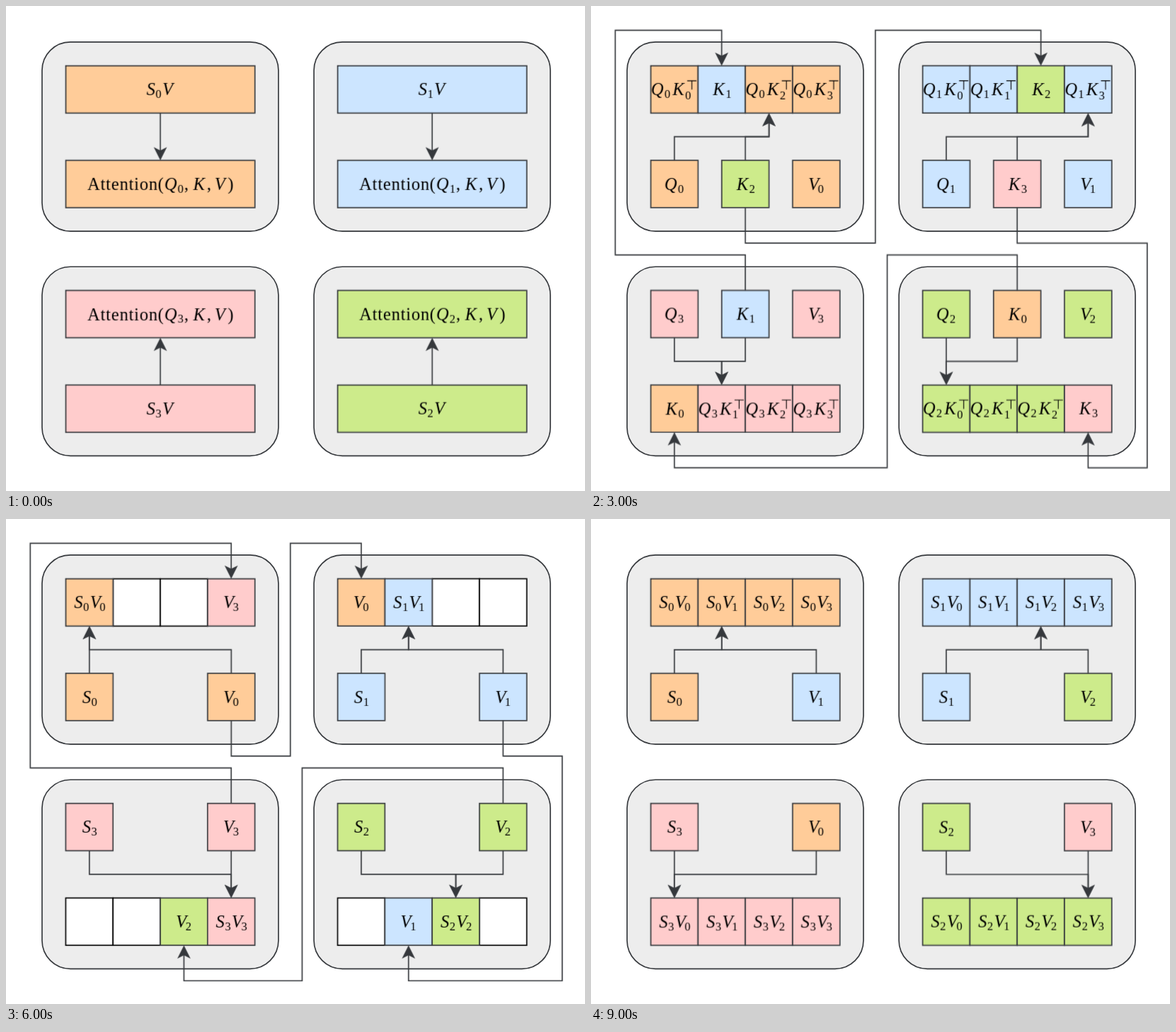
Recreate the animation shown at these times as an HTML page. Size 818 by 685 pixels, loop 10000 ms.

```html
<!DOCTYPE html>
<html lang="en">
<head>
<meta charset="utf-8">
<title>Ring attention</title>
<style>
  html, body { margin: 0; width: 100%; height: 100%; overflow: hidden; background: #fff; }
  svg { display: block; width: 100%; height: 100%; }
  .ink { stroke: #36393d; }
  .wire { fill: none; }
  .arrow { fill: #36393d; }
  .rule { fill: none; stroke: #000; stroke-width: 1.1; }
  text { font-family: "Liberation Serif", "Times New Roman", serif; font-size: 24.5px; }
  .it { font-style: italic; }
  .sub { font-size: 16.5px; }
  .stage { opacity: 0; animation: show 10s step-end infinite; }
  @keyframes show { 0% { opacity: 1; } 10%, 100% { opacity: 0; } }
</style>
</head>
<body>
<svg viewBox="0 0 818 685"><g id="scene" transform="scale(1.67) translate(.5 .5)"></g></svg>
<script>
const SCALE = 1.67, EM = 23.5;
const COLORS = ['#ffcc99', '#cce5ff', '#cdeb8b', '#ffcccc'];
const DEVICES = [
  { x: 30, y: 30, side: 240 },
  { x: 260, y: 30, side: 470 },
  { x: 260, y: 220, side: 250 },
  { x: 30, y: 220, side: 20 },
].map((dev, i) => {
  const top = i < 2;
  return {
    ...dev, i, top,
    bar: dev.y + (top ? 20 : 100),
    box: dev.y + (top ? 100 : 20),
    barIn: dev.y + (top ? 60 : 100),
    boxIn: dev.y + (top ? 100 : 60),
    mid: dev.y + 80,
    exit: top ? 170 : 240,
    lane: top ? 200 : 210,
  };
});
const mod4 = n => (n + 4) % 4;

// Letter metrics in em: advance, nudge of the glyph, slant allowance
const LETTERS = {
  Q: [.791, 0, 0], K: [.849, .1, .071], V: [.583, .02, .222], S: [.613, .08, .058],
};
const MARKS = { '(': .389, ')': .389, ',': .445 };

const text = (x, y, str, cls = '', spacing = 0) =>
  `<text class="${cls}" x="${x.toFixed(2)}" y="${y}" letter-spacing="${spacing}">${str}</text>`;

// Sets a formula such as "Q0K0^" from x; "^" is the transpose sign
function formula(src, x, y) {
  let svg = '';
  [...src].forEach((ch, k) => {
    const next = src[k + 1] || '';
    if (LETTERS[ch]) {
      const [advance, nudge, slant] = LETTERS[ch];
      svg += text(x + nudge * EM, y, ch, 'it');
      x += (advance + (/\d/.test(next) ? 0 : slant)) * EM;
    } else if (ch === '^') {
      if (/\d/.test(src[k - 1])) x -= (.404 - .071) * EM;
      svg += `<path class="rule" d="M${x + 1.5} ${y - 20.5}h13m-6.5 0v12.5"/>`;
      x += .7 * EM;
    } else if (MARKS[ch]) {
      svg += text(x, y, ch);
      x += MARKS[ch] * EM;
    } else {
      svg += text(x + .3, y + (next === '^' ? 5.5 : 3.8), ch, 'sub');
      x += .404 * EM;
    }
  });
  return { svg, end: x };
}

const centred = src => formula(src, -formula(src, 0, 0).end / 2, 8.3).svg;

const attention = i =>
  text(-103, 8.5, 'Attention', '', .8) + formula(`(Q${i},K,V)`, -3.5, 8.5).svg;

const softmax = i =>
  text(-90.5, 8.3, 'Softmax', '', .27) + text(-4.8, 8.3, '(') + text(80.5, 8.3, ')') +
  formula(`Q${i}K^`, 8, -7).svg +
  '<path class="rule" d="M6.5 1.6H80.5"/>' +
  '<path class="rule" d="M27.5 22l3.5-2.6 6.5 12.6 7.6-25.2H58.5"/>' +
  '<path class="rule" stroke-width="2" d="M31 19.8l6.3 11.6" style="stroke-width:2"/>' +
  text(45.8, 29.4, 'd', 'it');

function rect(x, y, w, fill, label = '') {
  const place = `translate(${x + w / 2} ${y + 20}) scale(${1 / SCALE})`;
  return `<rect class="ink" x="${x}" y="${y}" width="${w}" height="40" fill="${fill}"/>` +
    `<g transform="${place}">${label}</g>`;
}

const block = (dev, slot, name, owner) =>
  rect(dev.x + 20 + 60 * slot, dev.box, 40, COLORS[owner], centred(name + owner));

// Route ends vertically at (x, y); down is 1 or -1
const wire = (route, x, y, down) =>
  `<path class="ink wire" d="${route}V${y - 7 * down}"/>` +
  `<path class="ink arrow" d="M${x} ${y - 1.118 * down}l-4.5 ${-9 * down}` +
  `l4.5 ${2.25 * down}l4.5 ${-2.25 * down}z"/>`;

const cellX = (dev, j) => dev.x + 20 + 40 * j;

// One turn of the ring: "moving" blocks travel, "fixed" ones stay
function ringStep(dev, step, fixed, moving) {
  const { i, x } = dev;
  const held = mod4(i - step), incoming = mod4(held - 1), last = step === 3;
  const slot = moving === 'K' ? 1 : 2;
  const sourceX = x + 40 + 60 * slot;
  let svg = '', filled = '';

  for (let j = 0; j < 4; j++) {
    const cx = cellX(dev, j);
    if (mod4(i - j) <= step) {
      const label = fixed + i + moving + j + (moving === 'K' ? '^' : '');
      filled += rect(cx, dev.bar, 40, COLORS[i], centred(label));
    } else if (!last && j === incoming) {
      filled += rect(cx, dev.bar, 40, COLORS[j], centred(moving + j));
    } else {
      svg += `<rect x="${cx}" y="${dev.bar}" width="40" height="40" fill="#fff" stroke="#000"/>`;
    }
  }
  svg += filled + block(dev, 0, fixed, i) + block(dev, slot, moving, held);
  if (moving === 'K') svg += block(dev, 2, 'V', i);

  const targetX = cellX(dev, held) + 20;
  for (const from of [x + 40, sourceX])
    svg += wire(`M${from} ${dev.boxIn}V${dev.mid}H${targetX}`, targetX, dev.barIn, dev.top ? -1 : 1);

  if (!last) {
    const next = DEVICES[mod4(i + 1)];
    const endX = cellX(next, held) + 20;
    const route = `M${sourceX} ${dev.exit}V${dev.lane}H${dev.side}V${next.top ? 20 : 390}H${endX}`;
    svg += wire(route, endX, next.top ? 50 : 360, next.top ? 1 : -1);
  }
  return svg;
}

function softmaxStep(dev) {
  const { i, x } = dev;
  return rect(x + 20, dev.bar, 160, COLORS[i], softmax(i)) +
    block(dev, 0, 'S', i) + block(dev, 2, 'V', i) +
    wire(`M${x + 100} ${dev.barIn}V${dev.mid}H${x + 40}`, x + 40, dev.boxIn, dev.top ? 1 : -1);
}

function resultStep(dev) {
  const { i, x } = dev;
  return rect(x + 20, dev.bar, 160, COLORS[i], centred(`S${i}V`)) +
    rect(x + 20, dev.box, 160, COLORS[i], attention(i)) +
    wire(`M${x + 100} ${dev.barIn}`, x + 100, dev.boxIn, dev.top ? 1 : -1);
}

const turns = (fixed, moving) =>
  [0, 1, 2, 3].map(step => dev => ringStep(dev, step, fixed, moving));
const stages = [resultStep, ...turns('Q', 'K'), softmaxStep, ...turns('S', 'V')];

const panels = DEVICES.map(({ x, y }) =>
  `<rect class="ink" x="${x}" y="${y}" width="200" height="160" rx="24" fill="#ededed"/>`).join('');

document.getElementById('scene').innerHTML = panels + stages.map((draw, k) =>
  `<g class="stage" style="animation-delay:${k ? k - 10 : 0}s">${DEVICES.map(draw).join('')}</g>`).join('');
</script>
</body>
</html>
```
